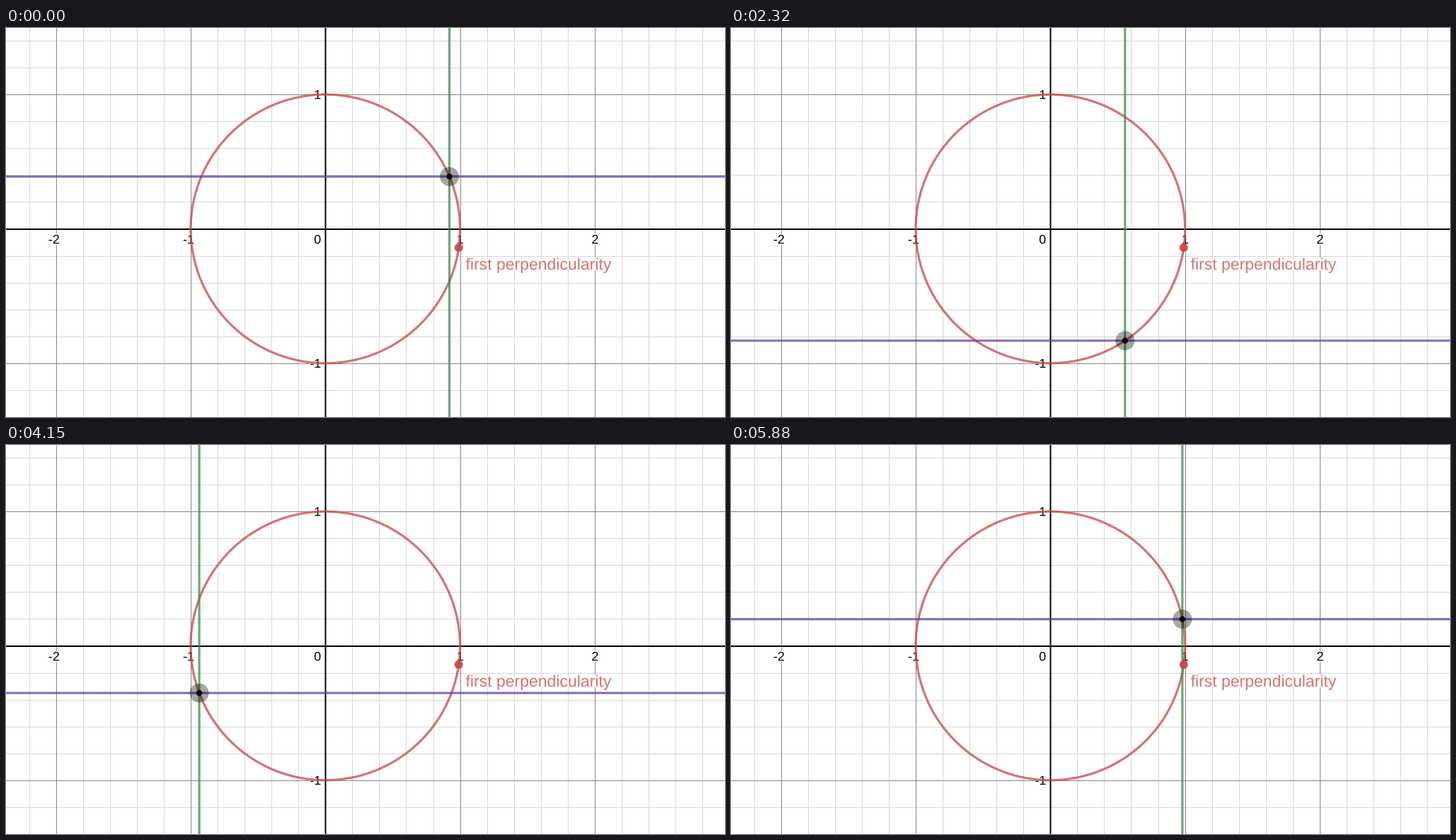
Animation, 1016 px wide and 551 px high, one loop 5.93 s. Source, as a matplotlib script:

```python
import numpy as np
import matplotlib.pyplot as plt
from matplotlib.animation import FuncAnimation
from matplotlib.patches import Circle, PathPatch
from matplotlib.path import Path
from matplotlib.textpath import TextPath

W, H, DPI = 1016, 551, 64
PX = 72 / DPI                       # one pixel in points
LOOP, TICK = 5930, 10               # milliseconds
CX, CY, UNIT = 451.3, 284.5, 190.3  # origin and unit length in pixels
RED, GREEN, PURPLE = "#c74440", "#388c46", "#6042a6"
LABEL_RED = "#d57370"

# Runs of slider steps: first time, last time, number of steps.
RUNS = [(30, 600, 13), (630, 1200, 13), (1250, 1810, 13), (1860, 2410, 12),
        (2470, 3060, 13), (3110, 3680, 13), (3720, 4280, 13),
        (4330, 4910, 14), (4970, 5530, 13), (5580, 5880, 7)]
STEP_TIMES = np.concatenate([np.round(np.linspace(*run), -1) for run in RUNS])

fig = plt.figure(figsize=(W / DPI, H / DPI), dpi=DPI, facecolor="white")
ax = fig.add_axes([0, 0, 1, 1])
ax.set_xlim(0, W)
ax.set_ylim(H, 0)
ax.axis("off")


def to_px(x, y):
    return CX + UNIT * x, CY - UNIT * y


def line(xs, ys, color, width, zorder, alpha=1):
    """Line at its exact position, without snapping to the pixel grid."""
    return ax.plot(xs, ys, color=color, lw=width * PX, alpha=alpha,
                   zorder=zorder, snap=False, solid_capstyle="butt")[0]


def draw_grid():
    for k in range(-12, 16):
        if k == 0:
            continue
        major = k % 5 == 0
        style = ("#858585", 1, 1.5) if major else ("#d6d6d6", 1, 1)
        x, y = np.round(to_px(k / 5, k / 5)) + 0.5
        line([x, x], [0, H], *style)
        if 0 < y < H:
            line([0, W], [y, y], *style)
    line([451.5, 451.5], [0, H], "black", 2, 2)
    line([0, W], [285, 285], "black", 2, 2)


def draw_text(text, x, baseline, size, color, zorder, anchor=0.0, halo=3.5):
    """Outlined text; anchor 0, 0.5 or 1 sets the horizontal alignment."""
    glyphs = TextPath((0, 0), text, size=size, prop={"family": "Liberation Sans"})
    box = glyphs.get_extents()
    left = x - anchor * (box.x0 + box.x1)
    path = Path(glyphs.vertices * [1, -1] + [left, baseline], glyphs.codes)
    ax.add_patch(PathPatch(path, fc="white", ec="white", lw=halo * PX,
                           joinstyle="round", snap=False, zorder=zorder))
    ax.add_patch(PathPatch(path, fc=color, lw=0, snap=False,
                           zorder=zorder + 0.1))


def disc(center, radius, color, alpha, zorder):
    return ax.add_patch(Circle(center, radius, fc=color, lw=0, snap=False,
                               alpha=alpha, zorder=zorder))


def angle_at(ms):
    """Slider value in 0.1 steps, bouncing between 0 and a full turn."""
    steps = np.searchsorted(STEP_TIMES, ms, side="right")
    phase = (4 + steps) % 126
    return min(min(phase, 126 - phase) / 10, 2 * np.pi)


draw_grid()
for value in (-2, -1, 1, 2):
    shift = -3 if value < 0 else 0.5
    draw_text(str(value), CX + UNIT * value + shift, 305.5, 18, "black", 3, 0.5)
draw_text("0", 440.2, 305.5, 18, "black", 3, 0.5)
draw_text("1", 440.5, 100.5, 18, "black", 3, 0.5)
draw_text("-1", 437.3, 481.2, 18, "black", 3, 0.5)

ax.add_patch(Circle((CX, CY), UNIT, fill=False, ec=RED, lw=3.2 * PX,
                    alpha=0.75, zorder=4))
vertical = line([], [], GREEN, 3.2, 5, 0.75)
horizontal = line([], [], PURPLE, 3.2, 6, 0.75)
disc(to_px(np.cos(0.14), -np.sin(0.14)), 6, RED, 0.9, 7)
draw_text("first perpendicularity", 649.5, 342.3, 23, LABEL_RED, 8)
glow = disc((0, 0), 13.5, "black", 0.35, 9)
dot = disc((0, 0), 4.2, "black", 0.95, 10)


def update(n):
    angle = angle_at(n * TICK)
    x, y = to_px(np.cos(angle), np.sin(angle))
    vertical.set_data([x, x], [0, H])
    horizontal.set_data([0, W], [y, y])
    glow.center = dot.center = (x, y)
    return vertical, horizontal, glow, dot


anim = FuncAnimation(fig, update, frames=LOOP // TICK, interval=TICK,
                     repeat=True, repeat_delay=0, blit=False)
plt.show()
```
